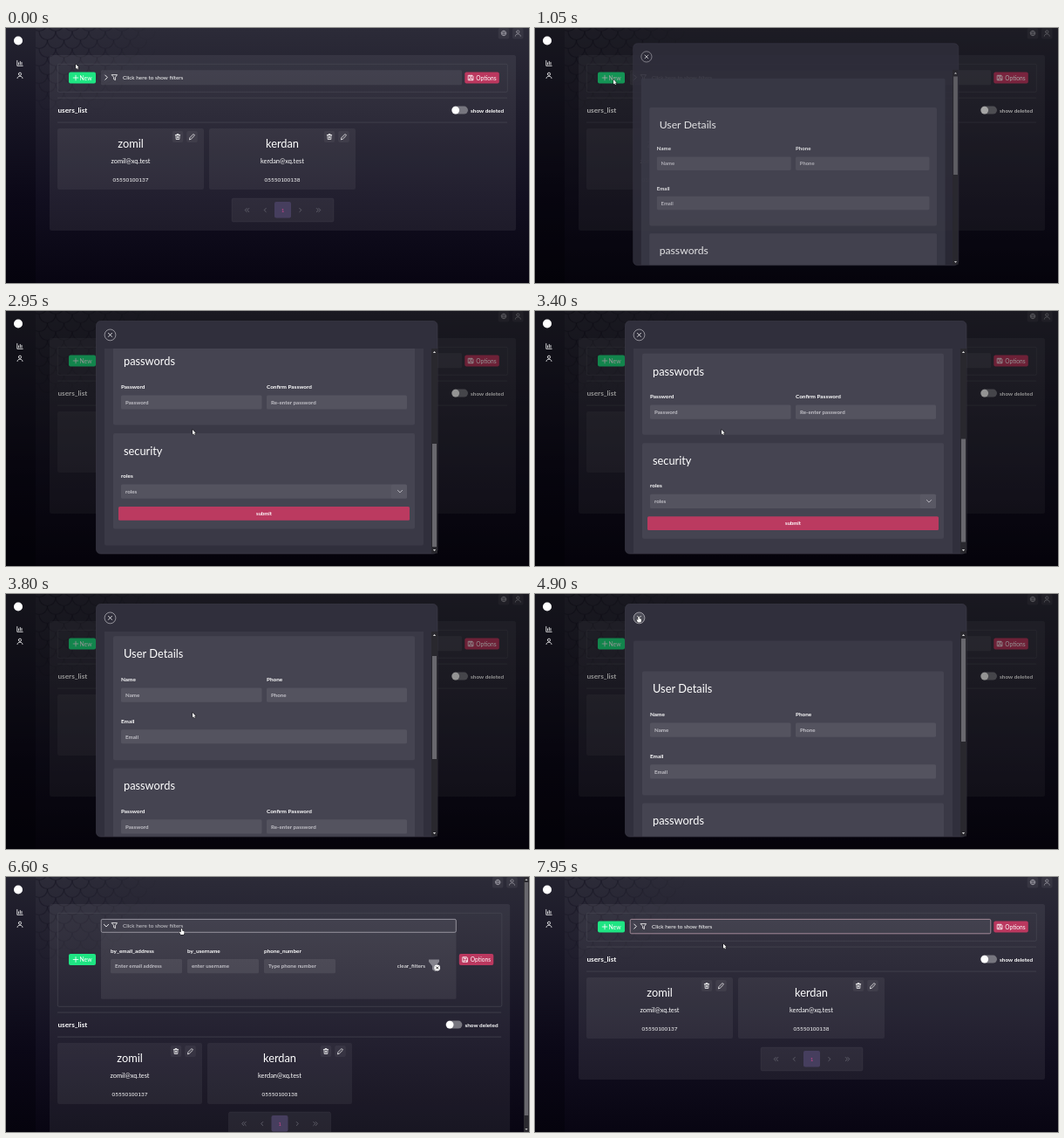
These frames come from a looping animation (600x292 px, 8000 ms). An HTML page with a canvas:

```html
<!DOCTYPE html>
<html lang="en">
<head>
<meta charset="utf-8">
<title>Users list</title>
<style>
html, body { margin: 0; width: 100%; height: 100%; overflow: hidden; background: #0a0716; }
canvas { display: block; width: 600px; height: 292px; }
</style>
</head>
<body>
<canvas id="stage"></canvas>
<script>
const W = 600, H = 292, LOOP = 8000, STEP = 50;
const canvas = document.getElementById('stage');
const ctx = canvas.getContext('2d');
const ratio = Math.max(1, window.devicePixelRatio || 1);
canvas.width = W * ratio;
canvas.height = H * ratio;

const USERS = [
  { name: 'zomil', mail: 'zomil@xq.test', phone: '05550100137' },
  { name: 'kerdan', mail: 'kerdan@xq.test', phone: '05550100138' }
];
const MAX_SCROLL = 202;

const clamp = v => Math.min(1, Math.max(0, v));
const span = (t, from, to) => clamp((t - from) / (to - from));
const smooth = u => u * u * (3 - 2 * u);
const sharp = u => u < .5 ? 8 * u ** 4 : 1 - 8 * (1 - u) ** 4;
const white = a => `rgba(255,255,255,${a})`;

function box(x, y, w, h, r, fill, stroke, width = .6) {
  ctx.beginPath();
  ctx.roundRect(x, y, w, h, r);
  if (fill) { ctx.fillStyle = fill; ctx.fill(); }
  if (stroke) { ctx.strokeStyle = stroke; ctx.lineWidth = width; ctx.stroke(); }
}

function text(str, x, y, size = 6.4, { color = '#fff', bold = false, align = 'left' } = {}) {
  ctx.font = `${bold ? 'bold ' : ''}${size}px Lato, sans-serif`;
  ctx.fillStyle = color;
  ctx.textAlign = align;
  ctx.fillText(str, x, y + size * .35);
}

// Strokes an SVG path centred on (x, y).
function icon(d, x, y, color = '#fff', width = .8, fill = false) {
  ctx.save();
  ctx.translate(x, y);
  const path = new Path2D(d);
  ctx.lineWidth = width;
  ctx.lineCap = ctx.lineJoin = 'round';
  ctx.strokeStyle = ctx.fillStyle = color;
  if (fill) ctx.fill(path); else ctx.stroke(path);
  ctx.restore();
}

function disc(x, y, r, fill, stroke) {
  box(x - r, y - r, 2 * r, 2 * r, r, fill, stroke);
}

function gradient(stops, y0 = 0, y1 = H) {
  const g = ctx.createLinearGradient(0, y0, 0, y1);
  stops.forEach((c, i) => g.addColorStop(i / (stops.length - 1), c));
  return g;
}

const ICONS = {
  user: 'M-1.6-1.6a1.6 1.6 0 1 0 3.2 0a1.6 1.6 0 1 0-3.2 0M-3 3.2c0-3.2 6-3.2 6 0',
  chart: 'M-3.2-3V3H3.2M-1.5 1.5V-.5M.3 1.5V-2M2 1.5V-1',
  globe: 'M-2.8 0a2.8 2.8 0 1 0 5.6 0a2.8 2.8 0 1 0-5.6 0H2.8M0-2.8C-1.8-1-1.8 1 0 2.8C1.8 1 1.8-1 0-2.8',
  trash: 'M-2.7-1.9H2.7M-1-1.9V-3H1V-1.9M-2.1-1.9L-1.8 3H1.8L2.1-1.9M-.6-.4V1.5M.6-.4V1.5',
  pencil: 'M-3 3L-2.5 1L1.5-3L3-1.5L-1 2.5Z',
  funnel: 'M-3-3H3L.9 0V3L-.9 2V0Z',
  plus: 'M-2.8 0H2.8M0-2.8V2.8',
  save: 'M-2.7-2.7H1.7L2.7-1.7V2.7H-2.7ZM-1.3-2.7V-1H1V-2.7M-1.5 2.7V.7H1.5V2.7',
  cross: 'M-2-2L2 2M2-2L-2 2',
  right: 'M-1.3-2.6L1.3 0L-1.3 2.6',
  down: 'M-2.6-1.3L0 1.3L2.6-1.3',
  up: 'M-1.6 1L0-1L1.6 1Z',
  low: 'M-1.6-1L0 1L1.6-1Z'
};

function background() {
  ctx.fillStyle = gradient(['#2c2b38', '#1f1d2c', '#120f20', '#080512']);
  ctx.fillRect(0, 0, W, H);
  // fish-scale texture fading away from the corner
  ctx.lineWidth = 1.2;
  for (let row = 0; row < 10; row++) {
    for (let col = 0; col < 8; col++) {
      const x = 38 + col * 19 + (row % 2) * 9.5, y = row * 10 - 6;
      const fade = clamp(1 - Math.hypot((x - 34) / 135, y / 105));
      ctx.strokeStyle = `rgba(10,8,22,${.4 * fade})`;
      ctx.beginPath();
      ctx.arc(x, y, 9.5, 0, Math.PI);
      ctx.stroke();
    }
  }
  ctx.fillStyle = gradient(['#242330', '#171524', '#0b0817', '#05030d']);
  ctx.fillRect(0, 0, 34, H);
}

function sidebarIcons() {
  disc(14, 14.5, 5, '#fff');
  icon(ICONS.chart, 16, 40.3);
  icon(ICONS.user, 16, 54.3);
}

function userCard(user, x, y, w) {
  box(x, y, w, 70, 2, white(.055));
  [[30, 'trash'], [13.5, 'pencil']].forEach(([right, name]) => {
    box(x + w - right - 6.3, y + 3, 12.6, 13, 2, white(.05));
    icon(ICONS[name], x + w - right, y + 9.5, '#fff', .75);
  });
  const mid = { align: 'center' };
  text(user.name, x + w / 2, y + 18, 12.8, mid);
  text(user.mail, x + w / 2, y + 37, 7.4, mid);
  text(user.phone, x + w / 2, y + 59, 6.4, mid);
}

function field(label, hint, x, y, w) {
  text(label, x, y, 6.4, { bold: true });
  box(x, y + 9.6, w, 16.2, 1.5, white(.08));
  text(hint, x + 5, y + 17.8, 6.2, { bold: true, color: '#c0bfc6' });
}

function filters(open, shift, focused, hover) {
  const right = 523 - 6.5 * shift, mid = 57 + 37.5 * open, body = 76 * open;
  box(59.3, 41.3, 516 - 6.5 * shift, 32 + 75 * open, 1.5, null, '#4b4a56');

  box(72, mid - 6.5, 31, 13, 2, hover ? '#1bd079' : '#1fe583');
  icon(ICONS.plus, 80, mid, '#fff', .8);
  text('New', 84.5, mid + .3, 6.8);
  const optX = 526.3 - 6.5 * shift;
  box(optX, mid - 6.5, 39.5, 13, 2, '#bb385f');
  icon(ICONS.save, optX + 7, mid, '#fff', .8);
  text('Options', optX + 13, mid + .3, 6.6);

  const headH = 17 - 1.5 * open;
  box(109, 48.3, right - 109, headH + body, 1.5, white(.07));
  if (body > 0) {
    ctx.save();
    ctx.beginPath();
    ctx.rect(109, 48 + headH, right - 109, body);
    ctx.clip();
    field('by_email_address', 'Enter email address', 120, 84.5, 82);
    field('by_username', 'enter username', 208, 84.5, 82);
    field('phone_number', 'Type phone number', 296, 84.5, 82);
    text('clear_filters', 481, 102, 6.4, { align: 'right' });
    icon('M-6-7H6V-4.5L2 .5V7L-2 4.5V.5L-6-4.5Z', 491, 101.5, '#85848d', 1, true);
    disc(494.7, 104, 3.4, '#fff');
    icon('M-1.2-1.2L1.2 1.2M1.2-1.2L-1.2 1.2', 494.7, 104, '#222', .9);
    ctx.restore();
  }
  if (focused) box(109.2, 48.4, right - 109.4, headH - .6, 1.5, null, open > .5 ? '#aaa8b1' : '#b99aa9', .8);
  const y = 56.6 - open;
  icon(open > .5 ? ICONS.down : ICONS.right, 115, y, '#fff', .9);
  icon(ICONS.funnel, 124.5, y, '#fff', .8);
  text('Click here to show filters', 134, y, 6.4, { color: open > .5 ? '#d0cfd5' : '#fff' });
}

function paginator(cx, y) {
  box(cx - 58.5, y, 117, 27, 2, white(.06), white(.08));
  box(cx - 9.5, y + 4, 19, 18.5, 2, '#463e5e');
  text('1', cx, y + 13.5, 6.4, { align: 'center', color: '#c8468a' });
  const gray = '#75747f', left = 'M1.2-2L-.8 0L1.2 2', fwd = 'M-1.2-2L.8 0L-1.2 2';
  [[-42.5, left], [-40, left], [-20.5, left], [20.5, fwd], [40, fwd], [42.5, fwd]]
    .forEach(([dx, d]) => icon(d, cx + dx, y + 13.5, gray, .7));
}

function page(open, focused, hover) {
  const shift = open > .67 ? 1 : 0, dy = 75 * open, right = 585 - 6.8 * shift;
  [['globe', 571], ['user', 587.3]].forEach(([name, x]) => {
    box(x - 6.8 * shift - 6.3, 0, 12.6, 12.5, 2, white(.06));
    icon(ICONS[name], x - 6.8 * shift, 6, '#a5a4ad', .7);
  });
  box(50, 31, right - 50, 201 + dy, 2.5, white(.065));
  filters(open, shift, focused, hover);
  ctx.fillStyle = '#484752';
  [80, 108].forEach(y => ctx.fillRect(59, y + dy - .3, right - 69, .7));
  text('users_list', 59.5, 94.3 + dy, 8.2, { bold: true });
  const sx = 511 - 6.6 * shift;
  box(sx, 89.6 + dy, 19, 9, 4.5, '#77767f');
  disc(sx + 4.8, 94.1 + dy, 4.3, '#fff');
  text('show deleted', sx + 22, 94.3 + dy, 6.4, { bold: true });
  const cardW = 168 - 2 * shift;
  USERS.forEach((user, i) => userCard(user, 59 + i * (cardW + 6), 115 + dy, cardW));
  paginator(317.5 - 3.5 * shift, 195 + dy - shift);
  if (shift) {
    ctx.fillStyle = '#2b2a30';
    ctx.fillRect(594, 0, 6, H);
    box(594.8, 6, 4.4, 267, 0, '#68676d');
    icon(ICONS.up, 597, 3, '#bbb', 1, true);
    icon(ICONS.low, 597, 289, '#bbb', 1, true);
  }
}

function section(title, y, h) {
  box(123, y, 346, h, 2, '#454451');
  text(title, 135, y + 20.3, 12.8);
}

function modal(scroll, hoverClose) {
  box(103.5, 11.5, 391.5, 266.5, 5, '#302f3c', '#3d3c49');
  disc(119.5, 27.4, 6.4, hoverClose ? white(.15) : null, '#d5d4d9');
  icon(ICONS.cross, 119.5, 27.4, '#fff', .8);

  ctx.save();
  ctx.beginPath();
  ctx.rect(104, 43, 391, 234.5);
  ctx.clip();
  const top = 88.4 - scroll, y2 = top + 151.2, y3 = top + 253.6;
  box(113, top - 35, 366, 417, 2, '#3a3946');
  section('User Details', top, 142);
  field('Name', 'Name', 132, top + 49.6, 161.5);
  field('Phone', 'Phone', 299, top + 49.6, 161);
  field('Email', 'Email', 132, top + 97.2, 328);
  section('passwords', y2, 93);
  field('Password', 'Password', 132, y2 + 49.2, 161.5);
  field('Confirm Password', 'Re-enter password', 299, y2 + 49.2, 161);
  section('security', y3, 109.5);
  field('roles', 'roles', 132, y3 + 49, 328);
  box(442, y3 + 58.6, 18, 16.2, 1.5, white(.03));
  icon(ICONS.down, 452, y3 + 66.6, '#d0cfd5', .8);
  box(129, y3 + 84, 334, 15.8, 1.5, '#bb3a60');
  text('submit', 296, y3 + 91.8, 5.9, { bold: true, align: 'center' });

  ctx.fillStyle = '#29282e';
  ctx.fillRect(488, 43, 7, 235);
  box(489, 51 + scroll * .5, 5, 118, 0, '#69686e');
  icon(ICONS.up, 491.5, 47, '#ddd', 1, true);
  icon(ICONS.low, 491.5, 274, '#ddd', 1, true);
  ctx.restore();
}

function pointer(x, y, hand) {
  const d = hand
    ? 'M-.7 0Q0-.9.7 0V2L3 2.8V5L2.2 6.6H-1L-2.6 3.8L-1.8 3.2L-.7 4Z'
    : 'M0 0V5.2L1.2 4.2L2 6L2.9 5.6L2.1 3.8H3.7Z';
  icon(d, x, y, '#111', .8);
  icon(d, x, y, '#fff', 1, true);
}

// [time, x, y]
const TRAIL = [
  [0, 80, 41.5], [850, 90, 59], [1550, 90, 59], [2050, 214, 136], [4080, 214, 136],
  [4600, 119, 26], [4950, 119, 26], [5700, 201.5, 59.5], [7600, 201.5, 59.5], [7950, 216, 76.5]
];

function pointerAt(t) {
  const i = TRAIL.findIndex(k => k[0] > t);
  if (i < 0) return TRAIL[TRAIL.length - 1].slice(1);
  const [t0, x0, y0] = TRAIL[i - 1], [t1, x1, y1] = TRAIL[i];
  const u = smooth(span(t, t0, t1));
  return [x0 + (x1 - x0) * u, y0 + (y1 - y0) * u];
}

function draw(t) {
  const open = sharp(span(t, 6150, 6550)) - sharp(span(t, 7300, 7700));
  const shown = smooth(span(t, 900, 1100)) - smooth(span(t, 4900, 5100));
  const scroll = MAX_SCROLL * (smooth(span(t, 2050, 2650)) - smooth(span(t, 3300, 4000)));
  const [x, y] = pointerAt(t);
  const over = (l, u, r, b) => x >= l && x <= r && y >= u && y <= b;
  const onNew = shown === 0 && open < .1 && over(72, 50, 103, 63.5);
  const onClose = shown > 0 && Math.hypot(x - 119.5, y - 27.4) < 6.5;
  const onHeader = shown === 0 && over(109, 48, 523, 65);

  ctx.setTransform(ratio, 0, 0, ratio, 0, 0);
  background();
  page(open, t >= 6100, onNew);
  if (shown > 0) {
    ctx.fillStyle = `rgba(0,0,0,${.42 * shown})`;
    ctx.fillRect(0, 0, W, H);
    ctx.save();
    ctx.globalAlpha = shown;
    const scale = .7 + .3 * shown;
    ctx.translate(299, 145);
    ctx.scale(scale, scale);
    ctx.translate(-299, -145);
    modal(scroll, onClose);
    ctx.restore();
  }
  sidebarIcons();
  pointer(x, y, onNew || onClose || onHeader);
}

const start = performance.now();
function tick() {
  const t = (performance.now() - start) % LOOP;
  draw(Math.floor(t / STEP) * STEP);
  requestAnimationFrame(tick);
}
tick();
</script>
</body>
</html>
```
